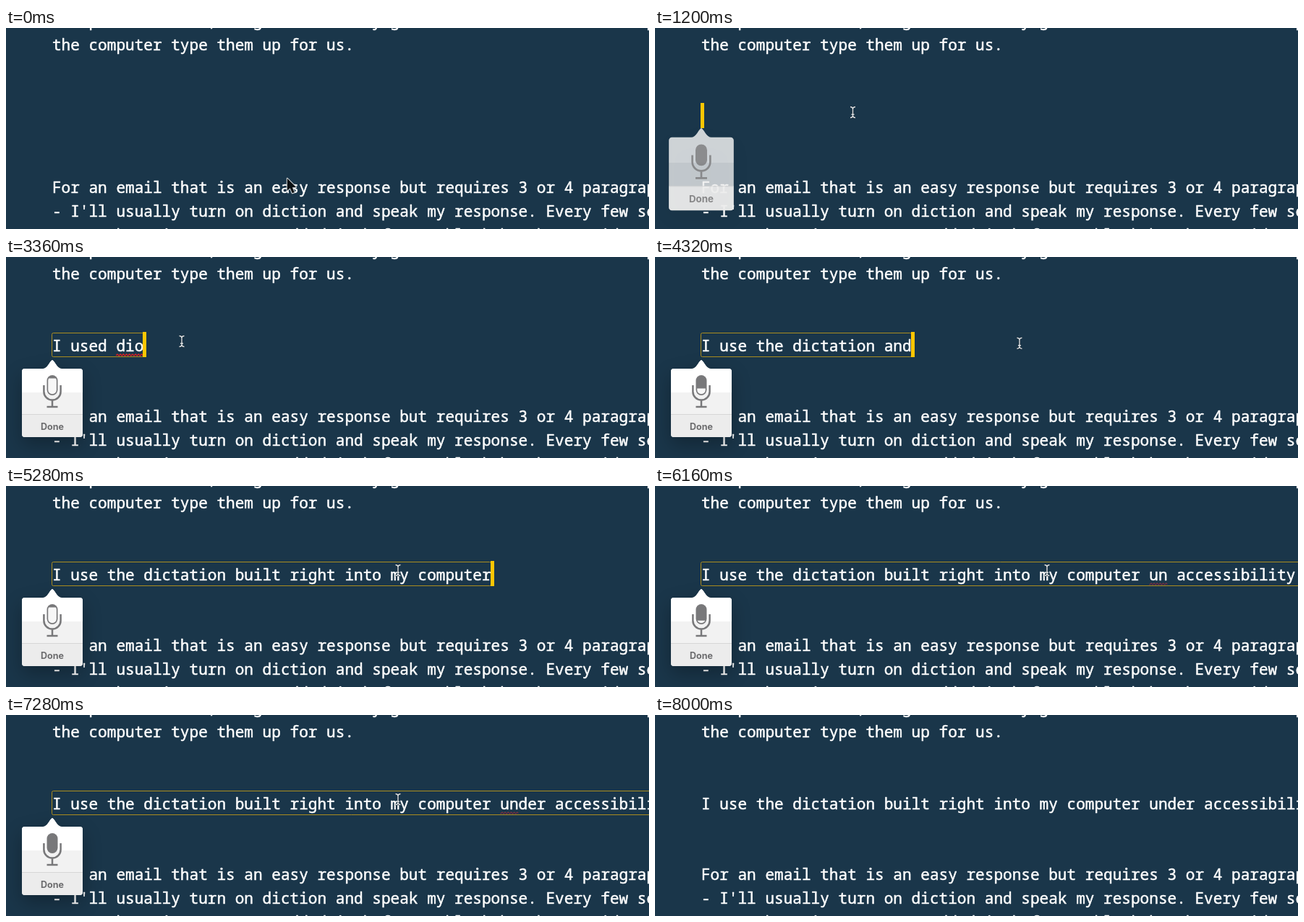
Animation, 889 px wide and 279 px high, one loop 8.08 s. Source, as an HTML page with a canvas:

```html
<!DOCTYPE html>
<html lang="en">
<head>
<meta charset="utf-8">
<title>Dictation</title>
<style>
html, body { margin: 0; width: 100%; height: 100%; overflow: hidden; background: #1a364a; }
canvas { display: block; }
</style>
</head>
<body>
<canvas id="stage" width="889" height="279"></canvas>
<script>
const ctx = document.getElementById('stage').getContext('2d');
const LOOP = 8080, STEP = 80, END = 8000;
const PITCH = 12.64, LEFT = 63.9, LINE = 33, FIRST = -2.5;
const GOLD = '#ffc600', MIC = '#78787a';
const MONO = '500 21.07px "Noto Sans Mono", "DejaVu Sans Mono", monospace';

// One entry per line of the page; empty lines leave room for the dictation
const page = [
  'example sentences, long documents by gesture and then have ideas put',
  'the computer type them up for us.',
  '', '', '', '', '',
  'For an email that is an easy response but requires 3 or 4 paragraphs',
  "- I'll usually turn on diction and speak my response. Every few sentences",
  'we catch a minute or so, added it before a block has been said out loud'
];
const SPOKEN_LINE = 4;

const USE = 'I use the dictation';
const BUILT = USE + ' built right into';
const COMPUTER = BUILT + ' my computer';
const FINAL = COMPUTER + ' under accessibility ';
const guesses = [
  '', 'I', 'I used dio', 'I used dict', 'I use the dict', USE, USE + ' and', USE + ' built',
  BUILT, BUILT + ' my', COMPUTER, COMPUTER + ' un accessibil', COMPUTER + ' un accessibility '
];

const ramp = (t, from, to) => Math.min(1, Math.max(0, (t - from) / (to - from)));
const col = n => LEFT + n * PITCH;
const baseline = n => FIRST + n * LINE;

function spokenText(t) {
  if (t >= 6960) return FINAL;
  const heard = Math.floor((t - 2800) / 240);
  return guesses[Math.min(guesses.length - 1, Math.max(0, heard))];
}

// Loudness swells and falls, fading in and out with the speech
function voice(t) {
  const swell = 0.59 + 0.25 * Math.cos((t - 3360) / 1920 * 2 * Math.PI);
  return swell * ramp(t, 1840, 2640) * (1 - ramp(t, 5600, 6800));
}

function write(text, y) {
  ctx.font = MONO;
  ctx.fillStyle = ctx.strokeStyle = '#fff';
  ctx.lineWidth = 0.5;
  [...text].forEach((char, i) => {
    ctx.fillText(char, col(i), y);
    ctx.strokeText(char, col(i), y);
  });
}

function squiggle(word, text, color) {
  const at = text.indexOf(word);
  if (at < 0) return;
  ctx.beginPath();
  for (let x = col(at); x < col(at + word.length); x++) {
    ctx.lineTo(x, 136 + 1.2 * Math.sin(x * 1.5));
  }
  ctx.strokeStyle = color;
  ctx.lineWidth = 1.3;
  ctx.stroke();
}

function drawSpoken(t) {
  const text = spokenText(t);
  const end = col(text.length);
  write(text, baseline(SPOKEN_LINE) + 1);
  if (t >= END) return;
  if (text) {
    ctx.strokeStyle = '#ab8d1f';
    ctx.lineWidth = 1;
    ctx.beginPath();
    ctx.roundRect(63.5, 105.5, end - 63.5, 33, 2);
    ctx.stroke();
  }
  squiggle('dio', text, '#e02020');
  squiggle('un', text.slice(0, 51).replace(BUILT, ' '.repeat(BUILT.length)), '#702f42');
  if (t >= 480) {
    ctx.fillStyle = GOLD;
    ctx.fillRect(Math.round(end - 0.9), 104, 5, 35);
  }
}

function panelShape() {
  const r = 4;
  ctx.beginPath();
  ctx.moveTo(64, 143);
  ctx.quadraticCurveTo(66, 144, 69, 149);
  ctx.quadraticCurveTo(73, 155, 77, 155);
  ctx.arcTo(106, 155, 106, 250, r);
  ctx.arcTo(106, 250, 22, 250, r);
  ctx.arcTo(22, 250, 22, 155, r);
  ctx.arcTo(22, 155, 51, 155, r);
  ctx.lineTo(51, 155);
  ctx.quadraticCurveTo(55, 155, 59, 149);
  ctx.quadraticCurveTo(62, 144, 64, 143);
  ctx.closePath();
}

function drawMic(level) {
  const top = 164, height = 28;
  ctx.fillStyle = MIC;
  ctx.beginPath();
  ctx.roundRect(56.5, top, 15, height, 7.5);
  ctx.fill();
  ctx.save();
  ctx.beginPath();
  ctx.roundRect(58.2, top + 1.7, 11.6, height - 3.4, 5.8);
  ctx.clip();
  ctx.fillStyle = '#f7f7f7';
  ctx.fillRect(56, top + height * (1 - level), 16, height);
  ctx.restore();

  ctx.strokeStyle = MIC;
  ctx.lineWidth = 2.5;
  ctx.beginPath();
  ctx.moveTo(52.4, 178);
  ctx.lineTo(52.4, 187);
  ctx.arc(64, 187, 11.6, Math.PI, 0, true);
  ctx.lineTo(75.6, 178);
  ctx.moveTo(64, 198);
  ctx.lineTo(64, 208);
  ctx.moveTo(56.5, 208);
  ctx.lineTo(71.5, 208);
  ctx.stroke();
}

function drawPopup(t) {
  if (t < 1120 || t >= END) return;
  const shown = ramp(t, 1120, 1440);
  const scale = 1 + 0.09 * (1 - shown);
  ctx.save();
  ctx.translate(64, 202);
  ctx.scale(scale, scale);
  ctx.translate(-64, -202);
  ctx.globalAlpha = Math.min(1, 0.4 + 1.5 * shown);

  panelShape();
  ctx.shadowColor = `rgba(0,0,0,${0.28 * shown})`;
  ctx.shadowBlur = 26;
  ctx.shadowOffsetY = 10;
  ctx.fillStyle = '#f2f2f2';
  ctx.fill();
  ctx.shadowColor = 'transparent';
  ctx.clip();
  ctx.fillStyle = `rgba(255,255,255,${shown})`;
  ctx.fillRect(22, 143, 84, 45);
  ctx.fillStyle = '#ececec';
  ctx.fillRect(22, 219, 84, 31);
  ctx.fillStyle = '#d6d6d6';
  ctx.fillRect(22, 218, 84, 1);

  drawMic(voice(t));
  ctx.font = '700 12.5px Inter, "Liberation Sans", sans-serif';
  ctx.textAlign = 'center';
  ctx.fillStyle = '#6c6c6e';
  ctx.fillText('Done', 64, 239.5);
  ctx.restore();
}

function drawArrow(x, y) {
  const shape = [[0, 0], [0, 17], [4, 13.5], [7, 20.5], [10, 19.2], [7, 12.5], [12.2, 12.2]];
  ctx.beginPath();
  shape.forEach(([dx, dy]) => ctx.lineTo(x + 0.8 + dx, y + 0.8 + dy));
  ctx.closePath();
  ctx.lineJoin = 'round';
  ctx.strokeStyle = '#d4d8db';
  ctx.lineWidth = 2;
  ctx.stroke();
  ctx.fillStyle = '#0b1013';
  ctx.fill();
}

function drawBeam(x, y) {
  ctx.beginPath();
  for (const side of [-1, 1]) {
    const end = y + side * 7.5, inner = y + side * 5;
    ctx.moveTo(x - 3.5, end);
    ctx.quadraticCurveTo(x - 0.5, end, x, inner);
    ctx.quadraticCurveTo(x + 0.5, end, x + 3.5, end);
  }
  ctx.moveTo(x, y - 5);
  ctx.lineTo(x, y + 5);
  ctx.moveTo(x - 2, y + 3);
  ctx.lineTo(x + 2, y + 3);
  for (const [color, width] of [['#14242f', 2.6], ['#dfe3e6', 1.4]]) {
    ctx.strokeStyle = color;
    ctx.lineWidth = width;
    ctx.stroke();
  }
}

function drawPointer(t) {
  if (t >= END) return;
  const arrive = ramp(t, 0, 560), back = ramp(t, 1200, 1440), across = ramp(t, 3840, 4390);
  const x = 388 - 114.5 * arrive - 30.5 * back + 299 * across;
  const y = 208 - 91 * arrive + 7 * Math.sin(Math.PI * across);
  (t < 400 ? drawArrow : drawBeam)(x, y);
}

function draw(now) {
  const t = Math.floor((now % LOOP) / STEP) * STEP;
  ctx.fillStyle = '#1a364a';
  ctx.fillRect(0, 0, 889, 279);
  page.forEach((text, i) => write(text, baseline(i)));
  drawSpoken(t);
  drawPopup(t);
  drawPointer(t);
}

const start = performance.now();
function tick() {
  draw(performance.now() - start);
  requestAnimationFrame(tick);
}
tick();
</script>
</body>
</html>
```
